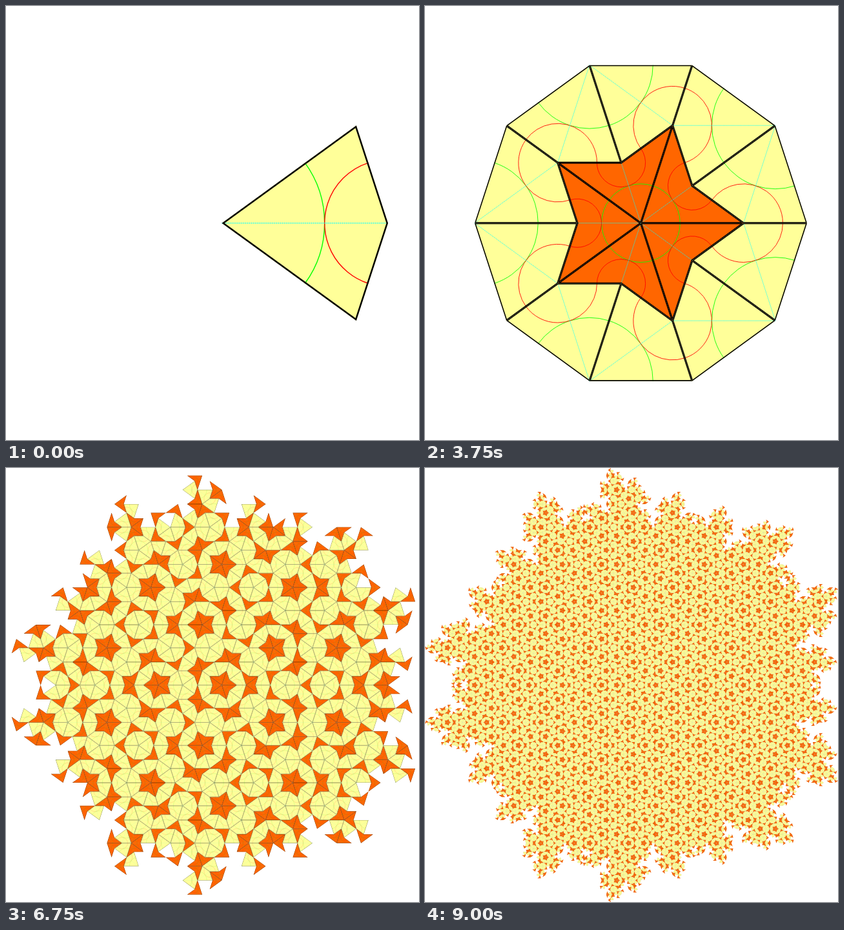
Animation of 640 by 673 pixels, one loop 9750 ms. Source, as an HTML page with a canvas:

```html
<!DOCTYPE html>
<html lang="en">
<head>
<meta charset="utf-8">
<title>Kite and dart deflation</title>
<style>
  html, body { margin: 0; width: 100%; height: 100%; overflow: hidden; background: #fff; }
  canvas { display: block; }
</style>
</head>
<body>
<canvas id="stage" width="640" height="673"></canvas>
<script>
const start = performance.now();
const W = 640, H = 673, CX = 334.45, CY = 336.65, R = 257.6;
const G = (1 + Math.sqrt(5)) / 2, T = Math.PI / 5;
const STEP = 750, KITES = 5, STEPS = 13;
const stage = document.getElementById('stage').getContext('2d');

// A tile has an acute tip (x, y) and an axis direction d in units of 36 degrees.
const tile = (kite, x, y, d) => ({ kite, x, y, d: ((d % 10) + 10) % 10 });
const polar = (t, r, d) => [t.x + r * Math.cos(d * T), t.y - r * Math.sin(d * T)];

function deflate(tiles, size) {
  const next = new Map();
  const add = t => next.set([t.kite, Math.round(t.x * 4), Math.round(t.y * 4), t.d].join(), t);
  for (const t of tiles) {
    if (!t.kite) add(tile(true, t.x, t.y, t.d));
    for (const k of [1, -1]) {
      const [x, y] = polar(t, G * size, t.d + k);
      if (t.kite) {
        add(tile(false, t.x, t.y, t.d + k));
        add(tile(true, x, y, t.d - 3 * k));
      } else {
        add(tile(false, x, y, t.d + k + 5));
      }
    }
  }
  return [...next.values()];
}

function outline(t, s) {
  const path = new Path2D();
  path.moveTo(t.x, t.y);
  path.lineTo(...polar(t, G * s, t.d - 1));
  path.lineTo(...polar(t, t.kite ? G * s : s, t.d));
  path.lineTo(...polar(t, G * s, t.d + 1));
  path.closePath();
  return path;
}

function render(tiles, s, gen) {
  const canvas = document.createElement('canvas');
  canvas.width = W;
  canvas.height = H;
  const c = canvas.getContext('2d');
  const scale = G ** -gen;
  const dash = [1.8 * scale, 1.2 * scale];

  const line = (colour, width) => {
    c.strokeStyle = colour;
    c.lineWidth = width * scale;
  };
  const sector = (colour, [x, y], r, d, half) => {
    line(colour, 1.4);
    c.beginPath();
    c.arc(x, y, r, (-d - half) * T, (half - d) * T);
    c.stroke();
  };
  const axis = (t, end) => {
    line('#0ff', 1.4);
    // Dashes far below a pixel blend into a paler line.
    if (gen < 4) c.setLineDash(dash);
    else c.globalAlpha = 0.6;
    c.beginPath();
    c.moveTo(t.x, t.y);
    c.lineTo(...end);
    c.stroke();
    c.setLineDash([]);
    c.globalAlpha = 1;
  };

  for (const t of tiles) {
    const shape = outline(t, s);
    const end = polar(t, t.kite ? G * s : s, t.d);
    const r = t.kite ? s : s / G;
    c.fillStyle = t.kite ? '#ff9' : '#f60';
    c.fill(shape);
    sector('#0f0', [t.x, t.y], r, t.d, 1);
    sector('#f00', end, r / G, t.d + 5, t.kite ? 2 : 3);
    axis(t, end);
    // Each border lies inside its own tile.
    c.save();
    c.clip(shape);
    line('#000', 5);
    c.stroke(shape);
    c.restore();
  }
  return canvas;
}

const sun = Array.from({ length: KITES }, (_, i) => tile(true, CX, CY, 2 * i));
const levels = [sun];
const sizeAt = gen => R / G ** (gen + 1);

function tilesAt(gen) {
  if (!levels[gen]) levels[gen] = deflate(tilesAt(gen - 1), sizeAt(gen - 1));
  return levels[gen];
}

const pictures = [];
function picture(step) {
  if (!pictures[step]) {
    const gen = Math.max(0, step - KITES + 1);
    const tiles = gen ? tilesAt(gen) : sun.slice(0, step + 1);
    pictures[step] = render(tiles, sizeAt(gen), gen);
  }
  return pictures[step];
}

let shown = -1;
function tick() {
  const step = Math.floor((performance.now() - start) / STEP) % STEPS;
  if (step !== shown) {
    shown = step;
    stage.clearRect(0, 0, W, H);
    stage.drawImage(picture(step), 0, 0);
    setTimeout(() => picture((step + 1) % STEPS), 50);
  }
  requestAnimationFrame(tick);
}
tick();
</script>
</body>
</html>
```
